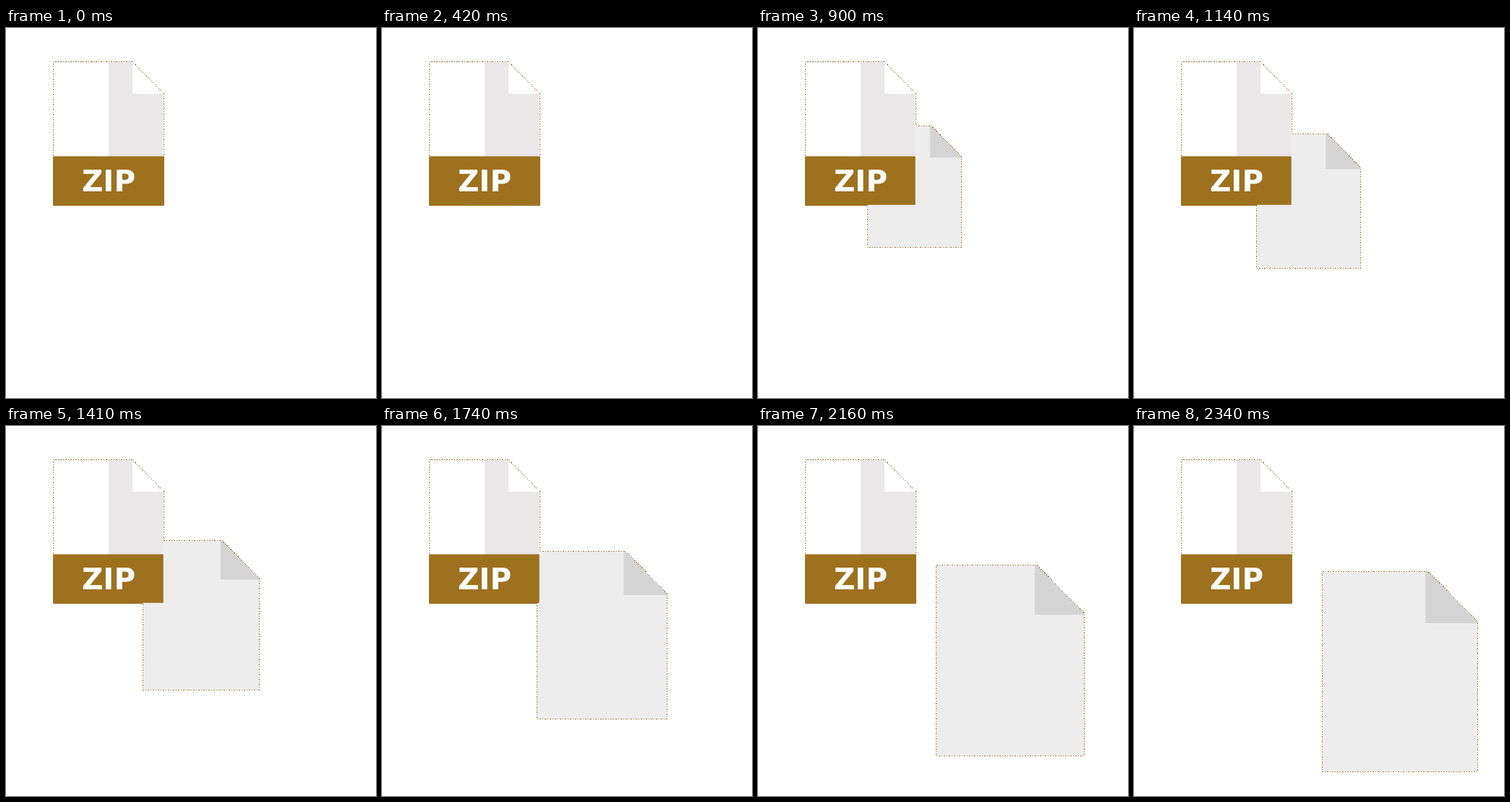
An HTML page that plays this animation: 512 by 512 pixels, repeating every 2.67 s.

```html
<!DOCTYPE html>
<html lang="en">
<head>
<meta charset="utf-8">
<title>Extracting a ZIP file</title>
<style>
  html, body { margin: 0; width: 100%; height: 100%; overflow: hidden; background: #fff; }
  svg { display: block; width: 100vw; height: 100vh; }
  .edge { fill: none; stroke: #a5752a; stroke-dasharray: 2 2 1 2; shape-rendering: crispEdges; }
  .label { font: bold 40.5px "DejaVu Sans", sans-serif; fill: #fff; }
</style>
</head>
<body>
<svg viewBox="0 0 512 512">
  <!-- rim of the archive, covered by the page where they overlap -->
  <rect x="65" y="177" width="154" height="69" rx="1.5" fill="#9e711f"/>
  <path class="edge" d="M65.5 177V46.5H175L218.5 91V177"/>

  <g id="page">
    <path id="sheet" fill="#ededed"/>
    <path id="fold" fill="#d4d4d4"/>
    <path id="outline" class="edge"/>
  </g>

  <path d="M66 47H174.5L217.5 90.5V178H66Z" fill="#fff"/>
  <path d="M66 47.5H175" stroke="#e4e2e2"/>
  <path d="M142 47.5H175V91H217.5V178H142Z" fill="#e9e7e7"/>
  <rect x="65.5" y="177.5" width="152.2" height="67.2" fill="#9e711f"/>
  <text class="label" x="105" y="226">ZIP</text>
</svg>
<script>
  const LOOP = 2670, STEP = 30, START = 420, END = 2340;
  const FULL = { x: 260.5, y: 201.5, w: 215.5, h: 277.5 };
  const SPEED = { x: 0.0756, y: 0.0454, scale: 0.000275 };
  const get = id => document.getElementById(id);
  const page = get("page"), sheet = get("sheet"), fold = get("fold"), outline = get("outline");
  const snap = v => Math.round(v) - 0.5;

  function draw(time) {
    const t = Math.floor((time % LOOP) / STEP) * STEP;
    page.style.display = t < START ? "none" : "";
    const ahead = Math.min(0, t - END);
    const scale = 1 + SPEED.scale * ahead;
    const x = FULL.x + SPEED.x * ahead;
    const y = FULL.y + SPEED.y * ahead;
    const left = snap(x), top = snap(y);
    const right = snap(x + FULL.w * scale), bottom = snap(y + FULL.h * scale);
    const foldX = x + 143 * scale, foldY = y + 71.5 * scale;
    const cutX = x + 146.5 * scale, cutY = y + 69 * scale;
    const shape = `M${left} ${top}H${cutX}L${right} ${cutY}V${bottom}H${left}Z`;
    sheet.setAttribute("d", shape);
    outline.setAttribute("d", shape);
    fold.setAttribute("d", `M${foldX} ${top}H${cutX}L${right} ${cutY}V${foldY}H${foldX}Z`);
  }

  const begin = performance.now();
  function tick() {
    draw(performance.now() - begin);
    requestAnimationFrame(tick);
  }
  draw(0);
  requestAnimationFrame(tick);
</script>
</body>
</html>
```
